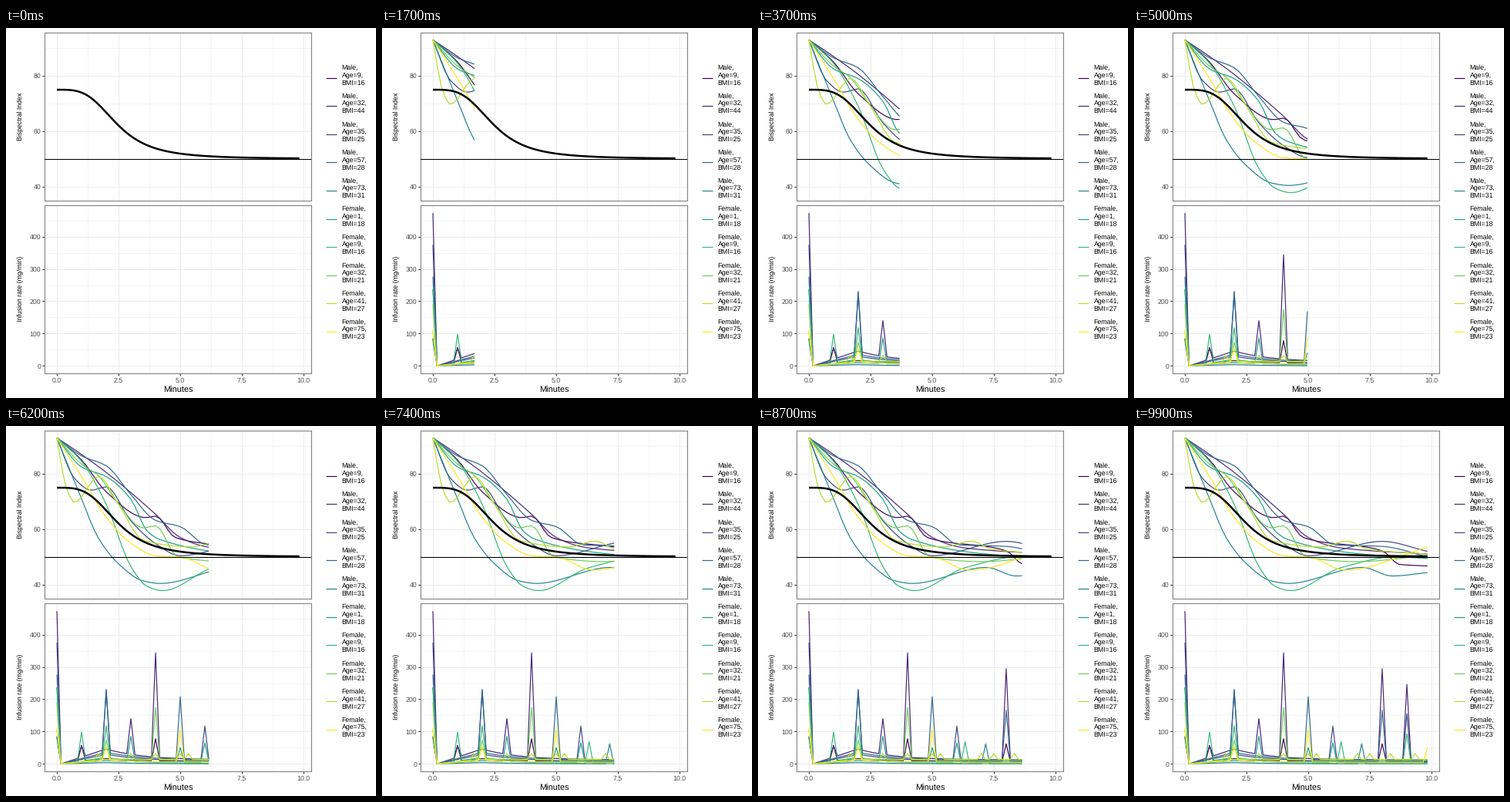
Write a matplotlib script that moves like this. It is 480 px wide and 480 px high and loops after 10000 ms.

```python
import matplotlib.pyplot as plt
import numpy as np
from matplotlib.animation import FuncAnimation
from matplotlib.ticker import FixedLocator

SIZE = 480
DPI = 72  # one point is one pixel
FRAMES = 100
STEP = 1 / 6  # minutes between samples
T_END = 59 * STEP
LEFT, RIGHT = 50.3, 396.4

plt.rcParams["font.family"] = "Liberation Sans"
plt.rcParams["text.hinting"] = "none"

times = np.arange(60) * STEP


def smooth(x, xk, yk):
    """Monotone cubic through the key points."""
    h = np.diff(xk)
    d = np.diff(yk) / h
    m = np.concatenate([d[:1], np.zeros(len(d) - 1), d[-1:]])
    for i in range(1, len(d)):
        if d[i - 1] * d[i] > 0:
            a, b = 2 * h[i] + h[i - 1], h[i] + 2 * h[i - 1]
            m[i] = (a + b) / (a / d[i - 1] + b / d[i])
    k = np.clip(np.searchsorted(xk, x, side="right") - 1, 0, len(h) - 1)
    s = (x - xk[k]) / h[k]
    return ((1 + 2 * s) * (1 - s) ** 2 * yk[k] + s * (1 - s) ** 2 * h[k] * m[k]
            + s * s * (3 - 2 * s) * yk[k + 1] + s * s * (s - 1) * h[k] * m[k + 1])


def effect(turns, last):
    """Index from 93 through a few turning points to its last value."""
    keys = {0: 93, **turns, T_END: last}
    return smooth(times, np.array(list(keys)), np.array(list(keys.values()), float))


def infusion(peak, tail, boluses):
    """Ramp up to two minutes, decay to a tail, plus one-sample boluses."""
    ramp = np.clip((times - STEP) / (2 - STEP), 0, 1)
    decay = np.exp(-np.maximum(times - 2, 0) / 1.5)
    rate = ramp * (tail + (peak - tail) * decay)
    for minute, dose in boluses.items():
        rate[round(minute / STEP)] = dose
    return rate


small = dict.fromkeys([1.67, 3, 4, 5, 5.33, 7, 7.5, 8.33, 9.33], 32)

patients = [
    ("Male", 9, 16,
     effect({1: 85, 2: 73.5, 3.6: 64.2, 4: 64.7, 4.8: 57, 8: 52.2, 8.7: 47.3}, 46.7),
     infusion(16, 7, {0: 85, 1: 57, 4: 78, 8: 62})),
    ("Male", 32, 44,
     effect({1: 87, 2: 80.5, 4: 65.4, 5: 57, 6.2: 53.4}, 51),
     infusion(46, 12, {0: 473, 1: 55, 3: 140, 4: 344, 8: 295, 9: 246})),
    ("Male", 35, 25,
     effect({.7: 78.5, 1.4: 74.1, 2: 75.3, 3: 63, 4: 54.8, 5: 50.4, 8: 55.6}, 52),
     infusion(30, 8, {0: 375, 2: 225, 6: 117, 9: 155})),
    ("Male", 57, 28,
     effect({1: 86.5, 2: 82.9, 3: 72.5, 4: 63.2, 5: 60.9, 6.1: 54.3, 8: 53.8}, 50),
     infusion(36, 11, {0: 276, 2: 231, 5: 208, 8: 166})),
    ("Male", 73, 31,
     effect({1: 71, 1.67: 57, 2.5: 47.5, 3.5: 41.3, 4.2: 40.4, 7.2: 46.2, 8.4: 43.1}, 44.3),
     infusion(4, 0, {0: 237, 7.17: 62})),
    ("Female", 1, 18,
     effect({1: 82.5, 2: 79, 3: 70.8, 3.67: 59.2, 4.2: 56.2, 7: 51.2}, 49.4),
     infusion(10, 4, {0: 80, 3: 86, 5: 50, 6: 65})),
    ("Female", 9, 16,
     effect({1: 84.5, 2: 69, 3: 46.5, 3.67: 39.3, 4.3: 37.8, 6.3: 46, 8.7: 50.2}, 49.5),
     infusion(20, 0, {0: 235, 1: 98, 2: 118, 6.33: 69, 9: 93})),
    ("Female", 32, 21,
     effect({1: 83.5, 1.67: 79.5, 2.5: 69, 3.5: 60.5, 4: 61.2, 4.9: 50, 7: 48.3}, 50.5),
     infusion(16, 10, {0: 190, 2: 73, 4: 175})),
    ("Female", 41, 27,
     effect({.35: 76, .7: 69.7, 1.7: 79, 2.5: 69, 3.5: 56, 5.5: 53.6, 6.6: 55.7, 7.4: 52.8}, 51),
     infusion(14, 14, {0: 105, **small})),
    ("Female", 75, 23,
     effect({1: 79, 2: 64.3, 3: 55, 4: 50.4, 5: 50, 6.5: 45.2}, 53.5),
     infusion(11, 5, {0: 112, 2: 52, 5: 107, T_END: 50})),
]

fig = plt.figure(figsize=(SIZE / DPI, SIZE / DPI), dpi=DPI, facecolor="white")


def panel(top, bottom, low, high, major, minor):
    ax = fig.add_axes([LEFT / SIZE, 1 - bottom / SIZE,
                       (RIGHT - LEFT) / SIZE, (bottom - top) / SIZE])
    ax.set_xlim(-.05 * T_END, 1.05 * T_END)
    pad = .05 * (high - low)
    ax.set_ylim(low - pad, high + pad)
    ax.xaxis.set_major_locator(FixedLocator(np.arange(0, 11, 2.5)))
    ax.xaxis.set_minor_locator(FixedLocator(np.arange(1.25, 10, 2.5)))
    ax.yaxis.set_major_locator(FixedLocator(major))
    ax.yaxis.set_minor_locator(FixedLocator(minor))
    ax.set_axisbelow(True)
    ax.grid(which="major", color="#ebebeb", lw=1.07)
    ax.grid(which="minor", color="#ebebeb", lw=.53)
    ax.tick_params(which="major", length=2.75, width=1.07, color="#333333",
                   pad=2.2, labelsize=8.8, labelcolor="#4d4d4d")
    ax.tick_params(which="minor", length=0)
    for spine in ax.spines.values():
        spine.set(color="#7f7f7f", linewidth=1.07)
    return ax


def label(x, y, text, size=8.8, **kw):
    fig.text(x / SIZE, 1 - y / SIZE, text, fontsize=size, color="black", **kw)


ax_bis = panel(5.5, 223.5, 37.8, 93, range(40, 81, 20), range(50, 91, 20))
ax_rate = panel(230.2, 448.2, 0, 473, range(0, 401, 100), range(50, 451, 100))
ax_bis.tick_params(axis="x", which="major", length=0, labelbottom=False)
ax_rate.xaxis.set_major_formatter("{x:.1f}")

goal_t = np.linspace(0, T_END, 200)
ax_bis.plot(goal_t, 50 + 25 / (1 + (goal_t / 2.45) ** 3.5), color="black",
            lw=2.5, solid_capstyle="butt", zorder=5)
ax_bis.axhline(50, color="black", lw=1.07, zorder=4)

label(19.3, 114.5, "Bispectral Index", rotation=90, ha="center", va="center")
label(19.3, 338.2, "Infusion rate (mg/min)", rotation=90, ha="center", va="center")
label(223.3, 473, "Minutes", size=11, ha="center", va="baseline")

traces = []
colors = plt.cm.viridis(np.linspace(0, 1, len(patients)))
for i, (sex, age, bmi, bis, rate) in enumerate(patients):
    y = 64.6 + 36.6 * i
    for j, text in enumerate((f"{sex},", f"Age={age},", f"BMI={bmi}")):
        label(435.7, y - 10.4 + 9.8 * j, text, va="baseline")
    fig.add_artist(plt.Line2D([415.2 / SIZE, 428.9 / SIZE], [1 - y / SIZE] * 2,
                              color=colors[i], lw=1.2, solid_capstyle="butt"))
    for ax, values in ((ax_bis, bis), (ax_rate, rate)):
        line, = ax.plot([], [], color=colors[i], lw=1.2, zorder=3,
                        solid_capstyle="butt", solid_joinstyle="round")
        traces.append((line, values))


def draw(frame):
    now = T_END * frame / (FRAMES - 1)
    shown = np.append(times[times < now], now) if frame else np.array([])
    for line, values in traces:
        line.set_data(shown, np.interp(shown, times, values))
    return [line for line, _ in traces]


anim = FuncAnimation(fig, draw, frames=FRAMES, interval=100, repeat=True,
                     repeat_delay=0, blit=False)
plt.show()
```
